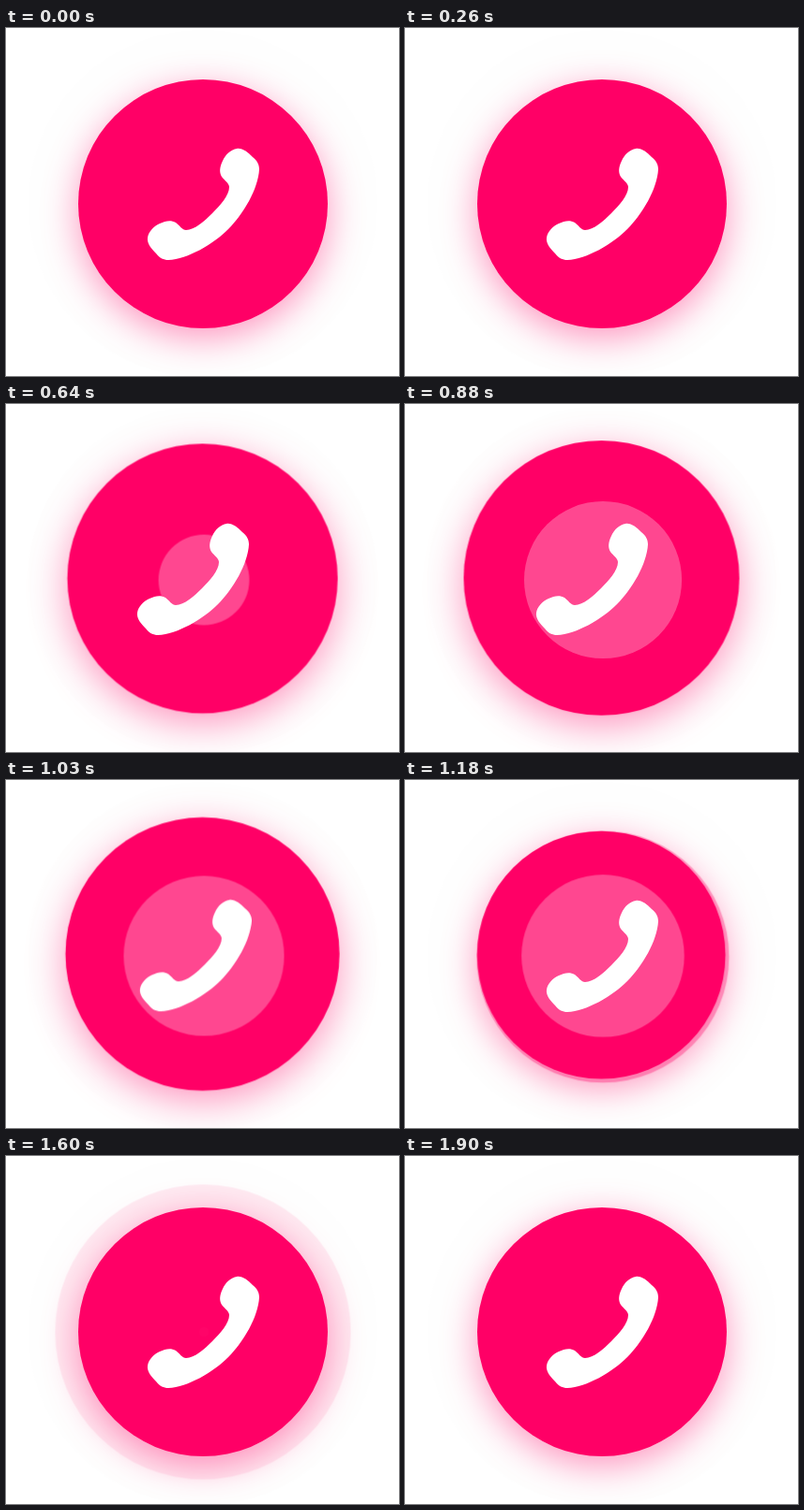
Write an HTML page that moves like this. It is 419 px wide and 372 px high and loops after 2320 ms.

```html
<!DOCTYPE html>
<html lang="en">
<head>
<meta charset="utf-8">
<title>Call button</title>
<style>
  html, body {
    margin: 0;
    width: 100%;
    height: 100%;
    overflow: hidden;
    background: #fff;
  }
  .stage {
    position: relative;
    width: 419px;
    height: 372px;
    overflow: hidden;
    --pink: #ff0066;
  }
  .disc {
    position: absolute;
    left: calc(var(--x, 209.5px) - var(--r));
    top: calc(var(--y, 187.5px) - var(--r));
    width: calc(2 * var(--r));
    height: calc(2 * var(--r));
    border-radius: 50%;
  }
  .halo { --r: 186px; background: #fefefe; }
  .button, .ring { --r: 133px; background: var(--pink); }
  .button { box-shadow: 0 10px 38px rgba(255, 0, 102, .42); }
  .ripple { --r: 87px; --x: 210.5px; --y: 188px; background: #fff; }
  .phone { position: absolute; left: 0; top: 0; fill: #fff; }

  .button, .ring, .ripple, .phone { animation: 2320ms linear infinite; }
  .button { animation-name: press; }
  .ring { animation-name: pulse; }
  .ripple { animation-name: ripple; }
  .phone { animation-name: nudge; }

  /* springs up, overshoots, then springs back */
  @keyframes press {
    0%, 21.12% { transform: none; animation-timing-function: cubic-bezier(.4, 0, .8, .8); }
    27.59% { transform: translate(-.5px, -1.5px) scale(1.083); animation-timing-function: ease-out; }
    31.9% { transform: translate(-.5px, -2px) scale(1.127); animation-timing-function: ease-in-out; }
    37.93%, 43.1% { transform: translate(-.5px, -2px) scale(1.105); animation-timing-function: ease-in-out; }
    50.86% { transform: translate(-.7px, -1px) scale(.995); animation-timing-function: ease-out; }
    54%, 100% { transform: none; }
  }
  @keyframes pulse {
    0%, 49.57% { transform: none; opacity: 0; }
    50.86% { transform: translate(.9px, .9px) scale(1.012); opacity: .33; }
    61.2% { transform: scale(1.086); opacity: .19; }
    74.14%, 100% { transform: scale(1.25); opacity: 0; }
  }
  @keyframes ripple {
    0%, 21.12% { transform: scale(0); opacity: .28; }
    27.59% { transform: scale(.552); opacity: .28; animation-timing-function: cubic-bezier(.2, .55, .5, 1); }
    37.93% { transform: scale(.966); opacity: .28; }
    50.86% { transform: scale(1); opacity: .28; }
    61.2% { transform: scale(.46); opacity: .13; }
    70.17%, 100% { transform: scale(0); opacity: 0; }
  }
  @keyframes nudge {
    0%, 21.12% { transform: none; }
    25.86%, 43.1% { transform: translate(-11px, -1px); }
    48.28%, 100% { transform: none; }
  }
</style>
</head>
<body>
<div class="stage">
  <div class="disc halo"></div>
  <div class="disc ring"></div>
  <div class="disc button"></div>
  <div class="disc ripple"></div>
  <svg class="phone" width="419" height="372" viewBox="0 0 419 372">
    <path d="M246 129C252 128 258 133 263 138C268 142 270 146 270 151
      C269 172 253 199 237 215C221 231 194 247 173 248
      C168 248 164 246 160 241C155 236 150 230 151 224
      C152 218 157 212 164 209C170 206 176 205 181 208
      C185 211 188 216 192 216C201 216 212 206 220 198
      C228 190 238 179 238 170C238 166 233 163 230 159
      C227 154 228 148 231 142C234 135 240 130 246 129Z"/>
  </svg>
</div>
</body>
</html>
```
